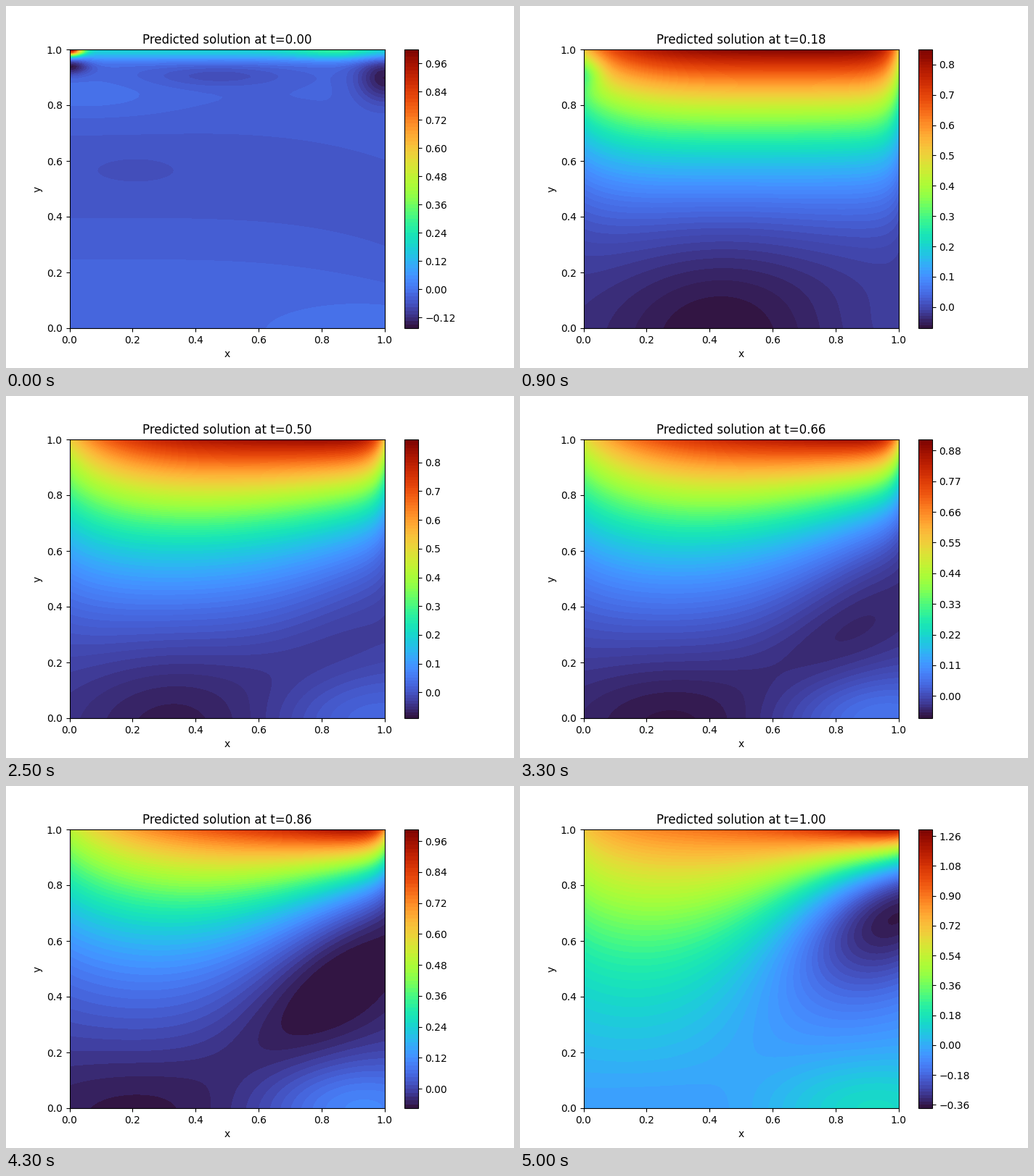
Recreate the animation shown at these times as a matplotlib script. Size 700 px wide and 500 px high, loop 5.1 s.

```python
import numpy as np
import matplotlib.pyplot as plt
from matplotlib.animation import FuncAnimation
from matplotlib.ticker import MaxNLocator

FRAMES = 51
START = .08  # time at which the flow has built up
X, Y = np.meshgrid(np.linspace(0, 1, 100), np.linspace(0, 1, 100))


def blob(x, y, width, height, peak, tilt=0):
    """Gaussian bump, its first axis turned by tilt."""
    c, s = np.cos(tilt), np.sin(tilt)
    along = c * (X - x) + s * (Y - y)
    across = c * (Y - y) - s * (X - x)
    return peak * np.exp(-(along / width) ** 2 - (across / height) ** 2)


def surge(t):
    """Steep growth just before the end."""
    return np.exp((t - 1) / .04)


def initial():
    """Nearly still field with a thin layer under the lid."""
    middle = .55 - .1 * X ** 4
    z = -.018 - .036 * np.exp(-((Y - middle) / .29) ** 2)
    lid = .2 + .1 * np.exp(-((X - .85) / .15) ** 2)
    z += lid * np.exp(-((1 - Y) / .035) ** 2)
    z += blob(.21, .57, .16, .06, -.011)
    z += blob(.05, .83, .3, .08, .024)
    z += blob(1, 0, .3, .1, .02)
    z += blob(.47, .905, .22, .04, -.045)
    z += blob(1, .9, .09, .09, -.13)
    z += blob(0, .94, .06, .03, -.15)
    z += blob(0, 1, .04, .02, .85)
    return z


def lid_speed(t):
    s = surge(t)
    left = (.3 + .06 * t - .15 * s) * np.exp(-X / (.12 + .2 * t * t - .2 * s))
    right = (.33 - .22 * s) * np.exp((X - 1) / .035)
    return .845 + .05 * s + .4 * t ** 5 * X ** 3 - left - right


def developed(t):
    s = surge(t)
    # Drag from the lid fades with depth, faster towards the right
    reach = (1 + .18 * t + .2 * s) / (1 + (2 * t * t + s) * X ** 3)
    depth = (1 - Y) / reach
    floor = .02
    z = (lid_speed(t) + floor) * np.exp(-2.6 * depth - 2.7 * depth ** 2) - floor
    # Slow zone on the floor, drifting left
    z += blob(.5 - .34 * t, 0, .4, .5 - .3 * t, -.05 - .012 * np.sin(np.pi * t))
    # Growing inflow at the lower right
    z += blob(.92, 0, .32, .17, .17 * t ** 1.6)
    # Backflow that climbs along the right wall
    back = blob(.84 + .15 * s, .15 + .43 * t * t + .17 * s, .4, .2 + .07 * s,
                -.09 * t * t - .3 * s, tilt=np.radians(50))
    z += back * (1 - Y ** 8)
    # Wake of the starting corner
    z += blob(0, .92, .06, .06, -.55 * np.exp(-t / .12))
    return z


def limits(t):
    s = surge(t)
    low = -.065 - .018 * np.sin(np.pi * t) ** 8 - .31 * s
    high = .845 + .24 * t ** 3 + .2 * s
    return np.array([low, high])


def mix(a, b, part):
    return a + (b - a) * part


fig = plt.figure(figsize=(7, 5), dpi=100)
locator = MaxNLocator(101, min_n_ticks=1)


def draw(i):
    t = i / (FRAMES - 1)
    part, later = min(t / START, 1), max(t, START)
    field = mix(initial(), developed(later), part)
    low, high = mix(np.array([-.16, 1.01]), limits(later), part)
    levels = np.round(locator.tick_values(low, high), 6)
    fig.clear()
    ax = fig.add_subplot()
    filled = ax.contourf(X, Y, np.clip(field, low, high),
                         levels=levels, cmap="turbo")
    fig.colorbar(filled, ax=ax)
    ax.set(xlabel="x", ylabel="y", title=f"Predicted solution at t={t:.2f}")
    return []


anim = FuncAnimation(fig, draw, frames=FRAMES, interval=100,
                     init_func=lambda: [], repeat=True, repeat_delay=0)
plt.show()
```
